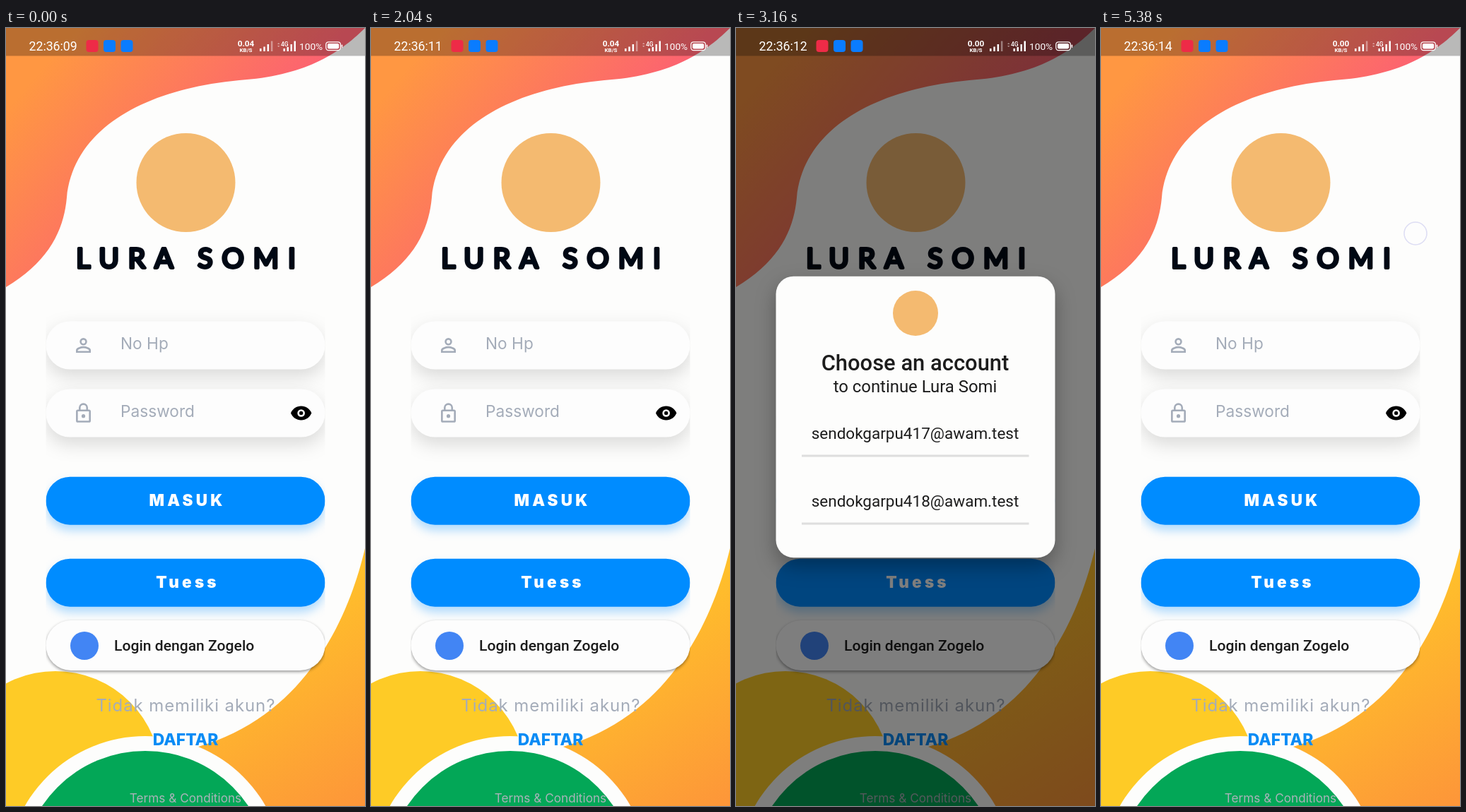
An HTML page that plays this animation: 508 px wide and 1102 px high, repeating every 5400 ms.

```html
<!DOCTYPE html>
<html lang="id">
<head>
<meta charset="utf-8">
<title>Login</title>
<style>
  html, body { margin: 0; width: 100%; height: 100%; overflow: hidden; background: #fdfdfc; }
  svg { display: block; width: 100%; height: 100%; }
  text { font-family: Inter, sans-serif; white-space: pre; }
  .mid { text-anchor: middle; }
  .roboto { font-family: Roboto, sans-serif; }
  .hint { fill: #a4acb9; font-size: 22.7px; }
  .icon { fill: none; stroke: #a4acb9; stroke-width: 2; }
  .title { font: 400 39px Lato, sans-serif; letter-spacing: 13px; fill: #000814;
    stroke: #000814; stroke-width: 4; stroke-linejoin: round; }
  .label { font-size: 22.5px; font-weight: 900; letter-spacing: 4.2px; fill: #fff; }
  .field { fill: #fdfdfd; filter: drop-shadow(0 10px 13px rgba(0, 0, 0, .14)); }
  .button { fill: #008cff; filter: drop-shadow(0 8px 7px rgba(0, 140, 255, .3)); }
  .social { fill: #fdfdfd; filter: drop-shadow(0 2px 2px rgba(0, 0, 0, .4)); }
  .panel { fill: #fdfdfc; filter: drop-shadow(0 12px 14px rgba(0, 0, 0, .3)); }
  .touch { fill: rgba(255, 255, 255, .3); stroke: rgba(190, 190, 235, .5); stroke-width: 1.5; }
</style>
</head>
<body>
<svg viewBox="0 0 508 1102" preserveAspectRatio="none">
  <defs>
    <linearGradient id="coral" gradientUnits="userSpaceOnUse" x1="40" y1="70" x2="260" y2="260">
      <stop stop-color="#ff9742"/><stop offset="1" stop-color="#fc6370"/>
    </linearGradient>
    <linearGradient id="amber" gradientUnits="userSpaceOnUse" x1="370" y1="850" x2="520" y2="1090">
      <stop stop-color="#ffbf2b"/><stop offset="1" stop-color="#fd9639"/>
    </linearGradient>
    <clipPath id="column"><rect x="56.5" y="380" width="395" height="560"/></clipPath>
  </defs>

  <rect width="508" height="1102" fill="#fdfdfc"/>
  <path fill="url(#coral)" d="M0 0H508C470 38 420 68 330 74C200 86 96 140 86 240C82 285 62 330 0 367Z"/>
  <path fill="url(#amber)" d="M508 737C488 822 432 972 272 1018L250 1102H508Z"/>
  <circle cx="70" cy="1060" r="149" fill="#fecb26"/>
  <circle cx="197" cy="1199" r="196" fill="#fdfdfc"/>
  <circle cx="197" cy="1199.6" r="175.6" fill="#03a757"/>

  <circle cx="254.5" cy="219" r="70" fill="#f4ba70"/>
  <text class="title mid" x="261" y="340">LURA SOMI</text>

  <g clip-path="url(#column)">
    <rect class="field" x="56.5" y="415.5" width="395" height="68" rx="34"/>
    <rect class="field" x="56.5" y="511.5" width="395" height="68" rx="34"/>
    <rect class="button" x="56.5" y="635.7" width="395" height="68" rx="34"/>
    <rect class="button" x="56.5" y="751.7" width="395" height="68" rx="34"/>
    <rect class="social" x="56.5" y="839" width="395" height="71" rx="35.5"/>
  </g>

  <g class="icon" transform="translate(93.8 433.8) scale(1.31)">
    <circle cx="12" cy="8" r="3"/>
    <path d="M5 19v-1.9c0-1.5 4-3.1 7-3.1s7 1.6 7 3.1V19Z"/>
  </g>
  <g class="icon" transform="translate(93.8 530) scale(1.31)">
    <rect x="5" y="9" width="14" height="12" rx="1"/>
    <path d="M8 9V6a4 4 0 0 1 8 0v3"/>
    <circle cx="12" cy="15" r="1"/>
  </g>
  <g transform="translate(401.7 529.5) scale(1.33)">
    <path d="M12 4.5C7 4.5 2.7 7.6 1 12c1.7 4.4 6 7.5 11 7.5s9.3-3.1 11-7.5c-1.7-4.4-6-7.5-11-7.5Z"/>
    <circle cx="12" cy="12" r="4" fill="#fdfdfd"/>
    <circle cx="12" cy="12" r="2"/>
  </g>

  <text class="hint" x="162" y="455">No Hp</text>
  <text class="hint" x="162" y="551">Password</text>
  <text class="label mid" x="256.5" y="677">MASUK</text>
  <text class="label mid" x="257" y="793">Tuess</text>
  <circle cx="111" cy="875" r="20" fill="#4285f4"/>
  <text class="roboto" x="153" y="882" font-size="21.1" font-weight="500" fill="#1c1c1c">Login dengan Zogelo</text>
  <text class="mid" x="254.4" y="968" font-size="24" letter-spacing=".9" fill="#a4acb9">Tidak memiliki akun?</text>
  <text class="mid" x="254" y="1016" font-size="22.9" font-weight="800" fill="#0a8cf5">DAFTAR</text>
  <text class="mid" x="254" y="1097" font-size="17.2" fill="#a9b3b9">Terms &amp; Conditions</text>

  <rect width="508" height="39.5" fill="#000" opacity=".27"/>
  <rect id="scrim" width="508" height="1102" opacity="0"/>

  <g id="dialog" opacity="0">
    <rect class="panel" x="56.5" y="351.7" width="395" height="398.5" rx="25"/>
    <circle cx="254" cy="404" r="32" fill="#f4ba70"/>
    <g class="mid" fill="#1c1c1c">
      <text class="roboto" x="253.5" y="485" font-size="30.9" font-weight="500">Choose an account</text>
      <text class="roboto" x="253.5" y="516" font-size="23.9">to continue Lura Somi</text>
      <text class="roboto" x="253.5" y="582" font-size="22.5">sendokgarpu417@awam.test</text>
      <text class="roboto" x="253.5" y="678" font-size="22.5">sendokgarpu418@awam.test</text>
    </g>
    <path d="M93 606H414.5M93 702H414.5" stroke="#dedede" stroke-width="3"/>
  </g>

  <g fill="#fff">
    <text id="clock" class="roboto" x="32.5" y="31.5" font-size="17.7"></text>
    <rect x="113.5" y="17" width="17" height="17" rx="4" fill="#ee2b47"/>
    <rect x="138" y="17" width="17" height="17" rx="4" fill="#0a7cff"/>
    <rect x="162.5" y="17" width="17" height="17" rx="4" fill="#0a7cff"/>
    <text id="rate" class="roboto mid" x="339.5" y="26" font-size="11.8" font-weight="700"></text>
    <text class="roboto mid" x="339.5" y="33.5" font-size="8" font-weight="700">KB/S</text>
    <path d="M359 29h2.5v4h-2.5zM364.3 26.5h2.5V33h-2.5zM369.6 23h2.5v10h-2.5z"/>
    <path d="M374.9 18.5h2.5V33h-2.5z" opacity=".4"/>
    <path d="M384 23l1.7-2 1.7 2zM384 25l1.7 2 1.7-2z" opacity=".5"/>
    <text class="roboto" x="389" y="25.5" font-size="8.5" font-weight="500">4G</text>
    <path d="M392.5 29h2.5v4h-2.5zM397.5 27h2.5v6h-2.5zM402.5 23h2.5v10h-2.5zM407.5 18.5h2.5V33h-2.5z"/>
    <text class="roboto" x="415" y="30.5" font-size="13.7">100%</text>
    <rect x="452.8" y="19.8" width="20.5" height="11.8" rx="3.5" fill="none" stroke="#fff" stroke-width="1.3"/>
    <rect x="455" y="22" width="16.1" height="7.4" rx="1.8"/>
    <rect x="474.6" y="23.5" width="1.6" height="4.5" rx=".8"/>
  </g>

  <circle id="touch" class="touch" r="16" opacity="0"/>
</svg>
<script>
const LOOP = 5400;
const OPEN = 2089, CLOSE = 3602, FADE = 200;
const FIRST_TICK = 940, RATE_DROP = 2940;
const [scrim, dialog, clock, rate, touch] =
  ['scrim', 'dialog', 'clock', 'rate', 'touch'].map(id => document.getElementById(id));

const clamp = v => Math.min(1, Math.max(0, v));
const bezier = (a, b, s) => 3 * a * s * (1 - s) ** 2 + 3 * b * s * s * (1 - s) + s ** 3;

// cubic-bezier(.25, .1, .25, 1)
function ease(x) {
  let lo = 0, hi = 1;
  for (let i = 0; i < 20; i++) {
    const m = (lo + hi) / 2;
    if (bezier(.25, .25, m) < x) lo = m; else hi = m;
  }
  return bezier(.1, 1, hi);
}

function placeTouch(x, y, opacity) {
  touch.setAttribute('cx', x);
  touch.setAttribute('cy', y);
  touch.setAttribute('opacity', opacity);
}

function render(t) {
  const shown = clamp((t - OPEN) / FADE) - clamp((t - CLOSE) / FADE);
  scrim.setAttribute('opacity', shown > 0 ? .5 * ease(shown) : 0);
  dialog.setAttribute('opacity', shown);
  dialog.setAttribute('transform',
    `translate(254 551) scale(${Math.max(shown, .001)}) translate(-254 -551)`);

  const second = 9 + Math.max(0, Math.floor((t - FIRST_TICK) / 1000) + 1);
  clock.textContent = '22:36:' + String(second).padStart(2, '0');
  rate.textContent = t < RATE_DROP ? '0.04' : '0.00';

  if (t >= 3520 && t < 3722) {
    placeTouch(405, 811, 1 - clamp((t - CLOSE) / 120));
  } else if (t >= 4700) {
    const p = clamp((t - 4700) / 650);
    placeTouch(450 - 5 * p, 294 - 3 * p, 1);
  } else {
    placeTouch(0, 0, 0);
  }
}

function frame() {
  render(performance.now() % LOOP);
  requestAnimationFrame(frame);
}
frame();
</script>
</body>
</html>
```
